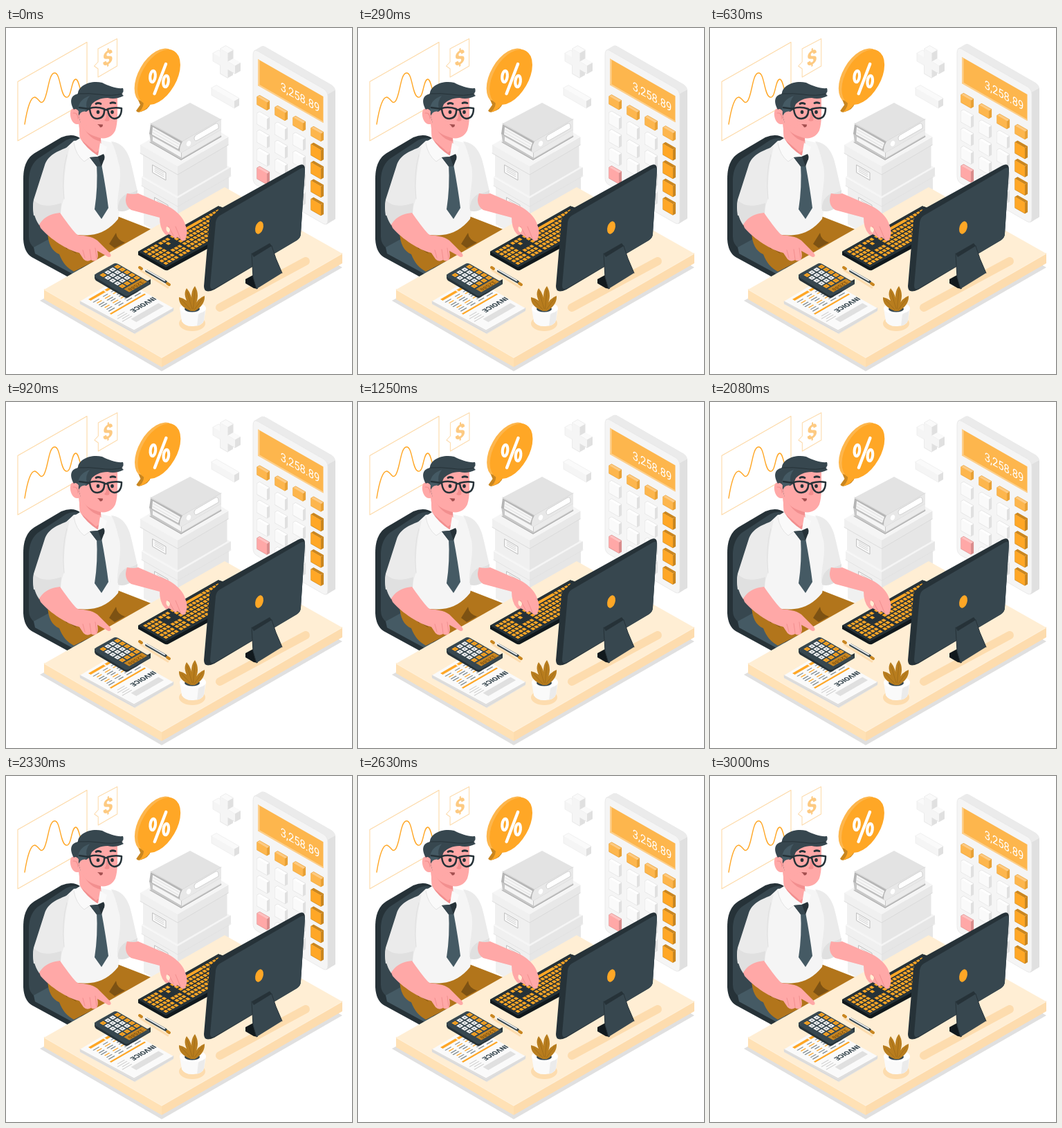
Animation of 500x500 px, one loop 3.04 s. Source, as an HTML page with a canvas:

```html
<!DOCTYPE html>
<html lang="en">
<head>
<meta charset="utf-8">
<title>Accountant at a desk</title>
<style>
html, body { margin: 0; width: 100%; height: 100%; overflow: hidden; background: #fff; }
canvas { display: block; width: 100vw; height: 100vh; }
</style>
</head>
<body>
<canvas id="stage"></canvas>
<script>
const canvas = document.getElementById('stage');
const ctx = canvas.getContext('2d');
const LOOP = 3040;
const SLOPE = 0.577;
const C = {
  dark: '#263238', slate: '#37474f', steel: '#455a64',
  orange: '#ffa726', amber: '#fdb64d', rust: '#c98620', brown: '#b2751b', umber: '#7d5213',
  skin: '#ffa8a7', blush: '#f28f8f',
  deskTop: '#ffeed4', deskLeft: '#ffe1b5', deskRight: '#fddcae',
  g1: '#fafafa', g2: '#f5f5f5', g3: '#ebebeb', g4: '#e0e0e0', g5: '#c7c7c7'
};

function fill(color, d) {
  ctx.fillStyle = color;
  ctx.fill(new Path2D(d));
}
function line(color, width, d) {
  ctx.strokeStyle = color;
  ctx.lineWidth = width;
  ctx.stroke(new Path2D(d));
}
function oval(color, x, y, rx, ry, rot = 0) {
  ctx.fillStyle = color;
  ctx.beginPath();
  ctx.ellipse(x, y, rx, ry, rot, 0, 7);
  ctx.fill();
}
function place(a, b, c, d, x, y, draw) {
  ctx.save();
  ctx.transform(a, b, c, d, x, y);
  draw();
  ctx.restore();
}
function shift(x, y, draw) { place(1, 0, 0, 1, x, y, draw); }
function rect(color, x, y, w, h) {
  ctx.fillStyle = color;
  ctx.fillRect(x, y, w, h);
}
function label(str, color, font, x, y) {
  ctx.fillStyle = color;
  ctx.font = font;
  ctx.textAlign = 'center';
  ctx.textBaseline = 'middle';
  ctx.fillText(str, x, y);
}

// Upright slab whose face falls to the right, with depth going up and right.
function slab(x, y, w, h, depth, face, top, side) {
  const s = w * SLOPE, e = depth * SLOPE;
  fill(top, `M${x} ${y}l${depth} ${-e}l${w} ${s}l${-depth} ${e}z`);
  fill(side, `M${x + w} ${y + s}l${depth} ${-e}v${h}l${-depth} ${e}z`);
  fill(face, `M${x} ${y}l${w} ${s}v${h}l${-w} ${-s}z`);
}

function chart() {
  line('#fdd9a6', 1.1, 'M17 77.500L117 20.500V106L17 163Z');
  line(C.orange, 1.4, 'M27 139C31 114 36 99 42 100C48 102 49 111 54 106C61 97 61 66 70 65C79 64 78 98 87 100C95 102 94 74 101 74C106 75 107 94 113 104');
}

function dollar() {
  line('#fddcae', 1.1, 'M133 30L160.500 15.500V55L133 71V59L127.500 55L133 49Z');
  place(0.95, -0.5, 0, 1, 147, 44.500, () =>
    label('$', '#fdca82', '900 28px Roboto, "Liberation Sans", sans-serif', 0, 0));
}

function disc(color, x, y, r) {
  place(0.866, -0.5, 0, 1, x, y, () => oval(color, 0, 0, r, r));
}
function percent() {
  disc(C.amber, 216.500, 69.500, 35.700);
  fill(C.rust, 'M191 104L194 111L188 119.500Q190 123 195 121Q206 118 209 109Z');
  disc(C.orange, 221, 71, 35.700);
  fill(C.orange, 'M198 104Q201 114 192 121.500Q202 120 209 109Z');
  ctx.strokeStyle = '#fff';
  ctx.lineWidth = 4.200;
  for (const [x, y] of [[212, 70], [231, 77]]) {
    ctx.beginPath();
    ctx.ellipse(x, y, 3.700, 8.200, 0.12, 0, 7);
    ctx.stroke();
  }
  line('#fff', 4.400, 'M214.500 95L231 52');
}

function signs() {
  fill(C.g4, 'M309.500 30l8 -4.600l11 6.300v12.700l10.500 6v11.500l-8 4.600l-3 -1.500v3l-8 4.600l-11 -6.500z');
  fill(C.g1, 'M309.500 30l8 -4.600l11 6.300l-8 4.600zM299 36.500l8 -4.600l2.500 1.500v9.500zM320.500 48.500l8 -4.600l10.500 6l-8 4.600z');
  fill(C.g2, 'M309.500 30l11 6.300v12.200l10.500 6v11.500l-10.500 -6v12l-11 -6.300v-12l-10.500 -6v-11.500l10.500 6z');
  line(C.g3, 0.7, 'M299 36.500l8 -4.600l2.500 1.500M309.500 30l8 -4.600l11 6.300M299 36.500v11.500l10.500 6v12l11 6.300');
  slab(297, 86.500, 33, 10.500, 7, C.g2, C.g1, C.g4);
  line(C.g3, 0.7, 'M297 86.500l7 -4l33 19M297 86.500v10.500l33 19');
}

function calcKey(col, row) {
  const x = 363 + col * 26;
  const y = (row ? 97 + row * 26.300 : 99.500) + col * 15;
  const h = row ? 15.500 : 11;
  let tones = [C.g1, '#fff', C.g4];
  if (!row) tones = [C.amber, '#fdca82', '#e8a136'];
  else if (col === 3) tones = [C.orange, C.rust, C.rust];
  else if (row === 4 && col === 0) tones = [C.skin, '#ffc0bf', '#d98d8d'];
  line(tones[2], 1.2, `M${x} ${y}l3.500 -2l14 8v${h}l-3.500 2l-14 -8z`);
  slab(x, y, 14, h, 3.500, ...tones);
  line(tones[0], 1, `M${x + 0.5} ${y + 0.5}l13 7.500v${h - 1}l-13 -7.500z`);
}
function calculator() {
  const shell = 'M357 39Q357 29.500 364 33.500L459 88Q465 92 465 99V277Q465 286.500 458 282.500L362 227Q357 224 357 217Z';
  shift(11, -6, () => fill(C.g4, shell));
  fill(C.g3, 'M358 33L369 26.500Q372 25.500 376 28L470 82Q475 85 476 90L465 96Z');
  fill(C.g4, 'M465 96L476 90V276L463 284Z');
  fill(C.g2, shell);
  line('#e6e6e6', 0.8, shell);
  fill(C.amber, 'M364 45L458.500 99V137L364 83Z');
  fill('#fdd08e', 'M364 45L366.500 46.500V82L364 83Z');
  fill('#fdd08e', 'M364 83L366.500 82L458.500 135V137Z');
  place(0.866, 0.5, 0, 1, 425, 101, () =>
    label('3,258.89', '#fff', '17px Roboto, "Liberation Sans", sans-serif', 0, 0));
  for (let row = 0; row < 5; row++)
    for (let col = 0; col < 4; col++) calcKey(col, row);
}

function box(x, y, left, right, h, a, b) {
  const l = left * 0.58, r = right * 0.58;
  fill(a, `M${x} ${y}l${-left} ${-l}v${h}l${left} ${l}z`);
  fill(b, `M${x} ${y}l${right} ${-r}v${h}l${-right} ${r}z`);
}
function tag(x, y) {
  const d = `M${x} ${y}l19 11v11l-19 -11z`;
  fill(C.g1, d);
  line('#bdbdbd', 1, d);
  for (let i = 1; i < 4; i++) line(C.g5, 0.8, `M${x + 3} ${y + 1.500 + i * 2.600}l13 7.500`);
}
function storage() {
  box(248, 252, 49, 74, 60, '#f0f0f0', '#e6e6e6');
  fill(C.g2, 'M196 215L248 246L325 202L272 172Z');
  box(248, 246, 52, 77, 12, '#f0f0f0', '#e6e6e6');
  line(C.g4, 0.8, 'M196 228L248 258L325 214');
  tag(215, 245);
  box(248, 206, 50, 71.500, 37, '#f0f0f0', '#e6e6e6');
  fill(C.g2, 'M194 169L248 200L321 157L268 126Z');
  box(248, 200, 54, 73.500, 12, '#f0f0f0', '#e8e8e8');
  line('#d6d6d6', 0.8, 'M194 181L248 212L321 169');
  tag(212, 198);
  // Binders
  fill(C.g5, 'M207 151L209 165L253 191L311 157V146L254 179Z');
  fill(C.g2, 'M212 157L253 180V187L212 163Z');
  line('#aaa', 1, 'M208 165L253 190.500L311 157');
  fill(C.g3, 'M254 180L311 147V155L254 188Z');
  fill('#b5b5b5', 'M209 139L207 153L252 178L257 165Z');
  fill(C.g2, 'M212 143L252 166L249 175L211 154Z');
  line(C.g4, 1, 'M213 147L250 168M212 151L249 172');
  fill('#e3e3e3', 'M209 138L266 108L311 132L255 164Z');
  line('#cfcfcf', 1, 'M209 138L255 164L311 132');
  fill('#e8e8e8', 'M255 164L311 132V147L252 181Q249 174 255 164Z');
  fill('#fff', 'M274 155L303 138Q307 137 307 142V145L277 162Q272 165 272 159Z');
  line(C.g5, 0.8, 'M274 155L303 138Q307 137 307 142V145L277 162Q272 165 272 159Z');
  oval('#fff', 264, 167, 3, 4, 0.4);
}

function chair() {
  fill(C.dark, 'M25 218C25 197 32 187 41 181L80 158Q97 151 108 160L150 300L112 364L92 361L37 331Q26 324 25 305Z');
  fill(C.slate, 'M33 222C33 202 41 192 49 187L87 162Q101 155 110 164L120 300L100 348L42 319Q33 312 33 302Z');
  fill(C.steel, 'M40 317L62 305L115 340L99 357L42 326Z');
}

function body() {
  fill(C.brown, 'M60 295L82 282L115 296L161 272L215 293L98 352C88 346 82 340 77 327C66 322 61 312 60 295Z');
  fill(C.umber, 'M159 296L149 312L157 318L172 310Q160 306 159 296Z');
  line(C.umber, 1, 'M72 300Q80 313 101 325M83 303Q82 313 88 319');
  fill(C.g2, 'M98 163L84 176C75 205 80 250 75 287Q95 302 122 299Q145 297 162 276L170 235C169 208 169 178 154 166L130 160Z');
  fill(C.g3, 'M92 171C72 179 61 184 56 198L40 248Q38 259 40 271L78 265L84 245Q82 212 92 171Z');
  line(C.g4, 1, 'M88 183Q80 210 84 247');
  fill(C.g3, 'M152 164C170 166 178 181 182 201L190 236L161 262C160 238 170 214 162 193Q158 174 152 164Z');
  fill(C.g4, 'M190 234Q181 240 175 239C165 245 161 252 162 264Q170 267 180 261Q175 252 190 239Z');
  fill(C.g4, 'M40 249Q53 262 80 253L79 268Q61 268 48 285Q37 269 40 249Z');
  // Neck, collar and tie
  fill(C.blush, 'M105 132L107 160Q118 177 132 184L138 181L137 157Z');
  fill(C.skin, 'M105 132L107 160L130 180L136 176L137 164Q121 161 112 143Z');
  fill(C.g1, 'M107 159L98 165Q100 183 113 193L123 186L133 185Q115 173 107 159Z');
  fill(C.g1, 'M136 166L133 184L142 184L146 172Z');
  line(C.g4, 0.9, 'M98 166Q101 184 113 193L123 186');
  fill(C.steel, 'M131 197L138 197Q145 235 148 260L138 276L128 262Q133 230 131 197Z');
  fill(C.dark, 'M121 187L132 186L141 182Q144 187 141 192L138 200L131 200Z');
  fill(C.slate, 'M121 187L133 186L138 200L131 200Z');
}

function head() {
  fill(C.skin, 'M101 117C94 114 91 121 94 131C97 140 104 140 108 138C113 149 120 154 130 157C143 163 154 157 158 148C162 137 161 120 161 100L120 96Z');
  line(C.blush, 1.2, 'M97 123Q104 122 104 131');
  fill(C.slate, 'M98 118C93 109 91 98 104 95C104 84 121 75 139 79C149 84 160 88 169 87Q171 92 167 95L170 98Q158 104 147 101C136 101 129 105 124 110L119 122L108 137Q104 127 105 120Q101 115 98 118Z');
  fill(C.steel, 'M104 118Q105 103 121 98Q114 106 117 117L112 126Q107 128 104 118Z');
  line(C.dark, 1, 'M104 95Q121 94 135 96Q153 99 168 95');
  fill(C.skin, 'M108 138L105 127Q109 119 116 121L122 117L128 145Z');
  line(C.dark, 2.800, 'M130 109.500Q133 107.500 137 109.500M151 108.500Q154 107 158 108.500');
  fill(C.blush, 'M145 121Q151 130 149 134Q144 136 142 133Q146 130 145 121Z');
  oval(C.dark, 133, 121.500, 2.300, 2.700);
  oval(C.dark, 153.500, 121.500, 2.300, 2.700);
  line(C.dark, 2.500, 'M106 115L121 117M121 116Q131 113 142 117Q143 130 132 131Q122 131 121 116ZM147 117Q157 114 167 116Q167 130 157 131Q148 130 147 117ZM142 119Q145 117 147 119');
  fill('#a24e4e', 'M132 139L140 139.500Q140 144 136 143.500Q135 141 132 139Z');
}

function desk() {
  fill(C.g4, 'M49 394L225 496L486 346L316 250Z');
  fill(C.deskLeft, 'M55 377L225 476V490L55 392Z');
  fill(C.deskRight, 'M486 325L225 476V490L486 340Z');
  fill(C.deskTop, 'M55 378L316 230L486 326L225 476.500Z');
  line('#fff4e3', 0.8, 'M55 378L225 476.500L486 326');
  line(C.deskRight, 12, 'M309 404L433 337');
}

function keyboard() {
  fill('#11191d', 'M191 323L305 259Q308 257 312 259L352 281V286L234 350Q231 351 228 349L191 328Z');
  fill(C.dark, 'M191 323L307 257L350 281L231 346Z');
  place(0.872, -0.49, 0.87, 0.5, 191, 323, () => {
    const key = (x, row, w = 4.300) => rect(C.orange, x, 4 + row * 6.700, w, 4.700);
    for (let row = 0; row < 6; row++) {
      for (let i = 0; i < 4; i++) key(4 + i * 5.700, row);
      for (let i = 0; i < 3; i++)
        if (row !== 2 && (row !== 1 || i === 1)) key(29 + i * 5.700, row);
      for (let i = 0; i < 14; i++)
        if (row || i < 3 || i > 8) key(48.500 + i * 5.800, row);
    }
    key(66, 0, 33.500);
  });
}

function arms() {
  fill(C.skin, 'M48 284Q57 269 78 267C86 278 94 290 103 299C113 300 124 301 132 307L150 325Q154 331 148 331L132 322Q134 331 131 335Q127 338 123 335Q117 339 112 334L106 325C88 321 64 305 50 289Z');
  line(C.blush, 1, 'M121 320L123 334M129 318L131 333M111 321L114 332');
  fill(C.skin, 'M175 239Q184 241 191 239L221 252C242 259 256 272 259 284Q264 295 259 306Q255 310 252 305L247 302Q245 307 241 301L235 298Q232 301 229 297Q222 289 222 274L181 263Q169 255 175 239Z');
  line(C.blush, 1, 'M235 287L242 300M245 287L252 304');
  fill(C.deskTop, 'M232 287Q237 288 237 292L235 296Q230 293 232 287Z');
}

function monitor() {
  fill(C.dark, 'M302 268Q305 264 310 261L422 199Q432 194 432 204L426 297Q426 303 420 307L301 378Q286 385 286 373L294 279Q295 272 302 268Z');
  fill(C.slate, 'M309 271L426 203Q432 200 432 207L426 297Q426 303 420 307L302 376Q295 380 295 372L303 281Q304 274 309 271Z');
  oval(C.orange, 366, 288.500, 5.500, 9.500, 0.3);
  fill('#11191d', 'M346 363L357 357L364 377L358 376L346 369Z');
  fill(C.dark, 'M355 326L381 311L385 316L358 332Z');
  fill(C.slate, 'M355 326L358 331L384 315L390 333L399 354L362 377L357 360Z');
  line(C.dark, 1, 'M355 326L357 360L362 377M384 315L390 333L399 354');
}

function invoice() {
  fill(C.g4, 'M107 395L185 437L242 404V409L186 442L107 399Z');
  fill(C.g1, 'M107 395L164 361L242 405L185 437Z');
  line('#d5d5d5', 0.8, 'M107 397L185 440L242 407M107 395L185 437L242 405');
  place(-0.866, 0.5, -0.866, -0.5, 242, 405, () => {
    label('INVOICE', C.slate, '900 10px Roboto, "Liberation Sans", sans-serif', 20, 31);
    rect(C.g4, 5, 11, 46, 9);
    for (let i = 0; i < 4; i++) rect(C.g5, 46, 23 + i * 4, 16 - i % 2 * 4, 1);
    rect(C.orange, 3, 43, 58, 2.500);
    for (let r = 0; r < 7; r++)
      for (let c = 0; c < 4; c++)
        rect(r % 3 === 2 ? C.orange : '#78858b', 5 + c * 14.500, 49 + r * 4.300, 10 - (r + c) % 3, 1.400);
    rect(C.orange, 22, 80, 36, 4);
    rect('#fff', 31, 80, 2, 4);
  });
}

function miniCalc() {
  fill(C.dark, 'M128 356L174 382L209 363V370L177 389Q174 391 171 389L130 365Q128 363 128 361Z');
  fill(C.slate, 'M130 355L155 341Q158 339 162 341L207 367Q210 369 207 371L178 386Q174 388 171 386L130 361Q126 358 130 355Z');
  place(0.866, -0.5, 0.866, 0.5, 130, 357, () => {
    for (let r = 0; r < 5; r++)
      for (let c = 0; c < 4; c++) {
        const hot = c === 3 || r === 4 || (r === 0 && c < 1);
        const x = 3 + c * 8, y = 3 + r * 8;
        rect(hot ? C.orange : '#f5f5f5', x, y, 6, 6);
        rect(hot ? C.rust : '#78858b', x + 2, y + 2, 2, 2);
      }
    rect(C.rust, 3, 43.500, 30, 9);
  });
  place(-0.866, 0.5, -0.866, -0.5, 187.200, 372.500, () =>
    label('12580', C.umber, 'bold 8px "Liberation Mono", monospace', 0, 0));
}

function pencil() {
  line(C.deskRight, 3, 'M194 350L234 375');
  line(C.slate, 4, 'M203 351L231 367');
  line('#eceff1', 2, 'M198 347L229 365');
  line(C.rust, 4, 'M193 346L196 348M233 369L236 371');
}

function plant() {
  oval(C.deskRight, 269, 427, 19, 11);
  fill(C.g1, 'M251 405L254 424Q259 432 271 431Q284 430 286 423L289 405Z');
  fill(C.g3, 'M278 414L288 406L286 423Q283 429 276 430.500Z');
  oval('#fff', 270, 405, 19, 8.500);
  oval(C.slate, 269, 406, 11, 4.500);
  fill('#b87d1e', 'M267 409Q249 402 250 389Q262 391 267 403Q254 387 261 376Q269 385 270 401Q265 382 273 373Q281 386 273 402Q276 391 287 387Q288 400 273 409Z');
  line('#9a6817', 0.7, 'M254 393L267 407M262 382L269 406M273 379L270.500 406M284 391L272 407');
}

function draw(ms) {
  const wave = (1 - Math.cos(ms / LOOP * Math.PI * 2)) / 2;
  const k = canvas.width / 500, m = canvas.height / 500;
  ctx.setTransform(k, 0, 0, m, 0, 0);
  ctx.fillStyle = '#fff';
  ctx.fillRect(0, 0, 500, 500);
  ctx.lineCap = ctx.lineJoin = 'round';
  chart();
  shift(wave * 0.5, 0, dollar);
  shift(wave * 0.6, 0, percent);
  signs();
  storage();
  shift(0, -8.200 * wave, calculator);
  chair();
  body();
  head();
  desk();
  keyboard();
  arms();
  invoice();
  miniCalc();
  pencil();
  plant();
  monitor();
}

function resize() {
  const ratio = window.devicePixelRatio || 1;
  canvas.width = Math.round(innerWidth * ratio);
  canvas.height = Math.round(innerHeight * ratio);
}
addEventListener('resize', resize);
resize();

const start = performance.now();
function tick() {
  draw((performance.now() - start) % LOOP);
  requestAnimationFrame(tick);
}
tick();
</script>
</body>
</html>
```
